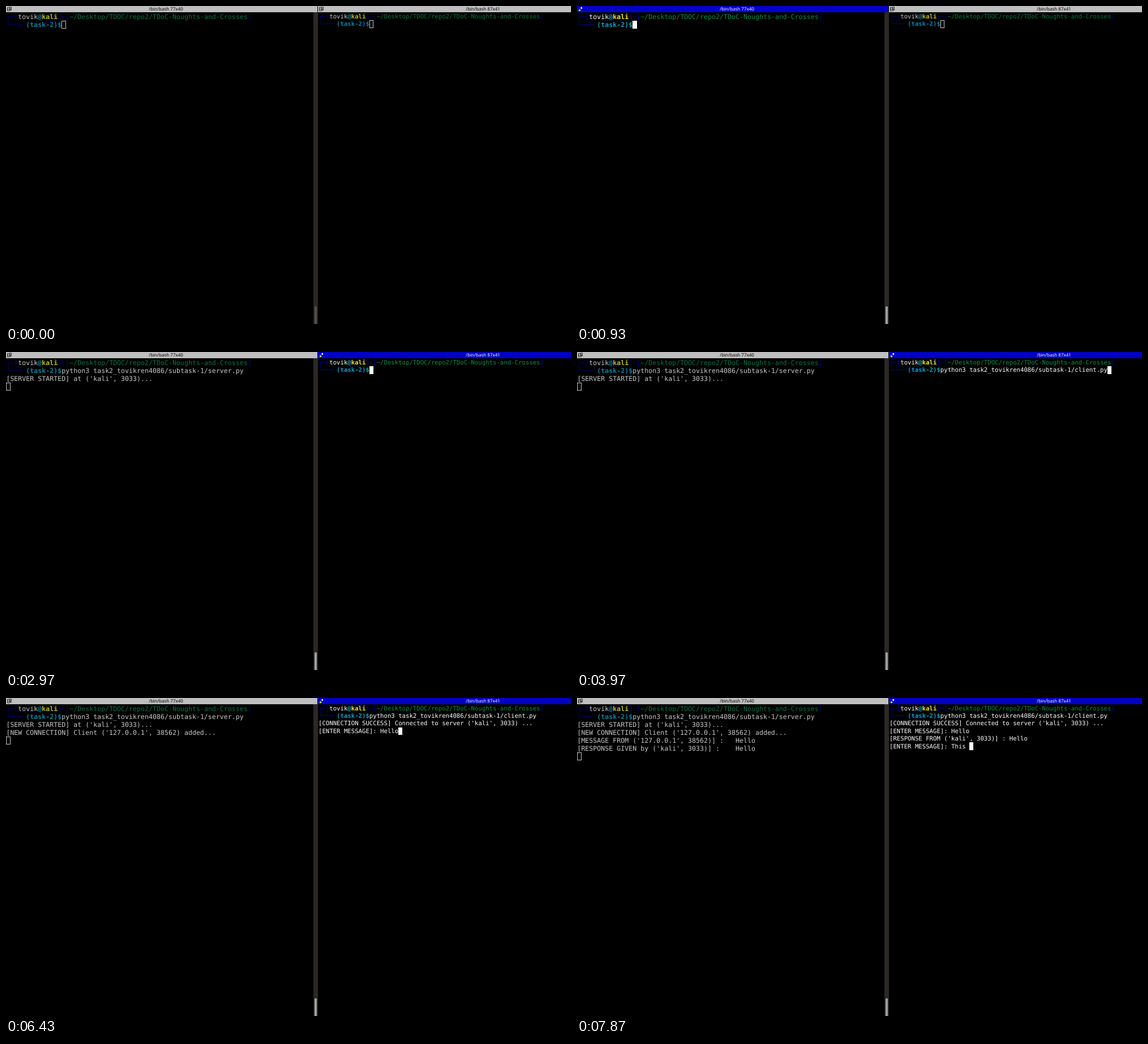
Recreate the animation shown at these times as an HTML page. Size 998 by 561 pixels, loop 8 s.

```html
<!DOCTYPE html>
<html lang="en">
<head>
<meta charset="utf-8">
<title>Two terminals</title>
<style>
html, body { margin: 0; width: 998px; height: 561px; overflow: hidden; background: #000; }
body { position: relative; }
.bar, .pane, .row, .cur, .label, .icon, #scroll, #thumb { position: absolute; }
.bar { top: 0; height: 11px; background: #bebebe; color: #000; }
.bar.on { background: #0000c8; color: #fff; }
.label { top: 0; width: 100px; text-align: center; white-space: pre; text-rendering: geometricPrecision;
  font: 8px/11px "Noto Sans", sans-serif; }
.icon { left: 2px; top: 1px; }
.icon .lit, .on .icon .dim { display: none; }
.on .icon .lit { display: inline; }
.pane { top: 0; color: #c8c8c8; font-family: "DejaVu Sans Mono", monospace;
  text-rendering: geometricPrecision; font-kerning: none; font-variant-ligatures: none;
  --line: #00007c; --host: #bcb827; --at: #0b7fa0; --path: #08733f; }
.pane.on { color: #fff; --line: #0000a0; --host: #ebe632; --at: #0d9cc2; --path: #0a8f4e; }
.row { left: 0; white-space: pre; }
.l { color: var(--line); }
.h { color: var(--host); font-weight: bold; }
.a { color: var(--at); font-weight: bold; }
.p { color: var(--path); }
.cur { box-sizing: border-box; border: 1px solid #c8c8c8; }
.on .cur { background: #fff; border-color: #fff; }
#scroll { left: 543px; top: 11px; width: 8px; height: 550px; background: #2b2825; }
#thumb { left: 545px; top: 530px; width: 4px; height: 31px; border-radius: 1px 1px 0 0; }
</style>
</head>
<body>
<div id="scroll"></div>
<div id="thumb"></div>
<script>
const LOOP = 8000;
const span = (cls, text) => `<span class="${cls}">${text}</span>`;
const head = span('l', '┌─[') + 'tovik' + span('a', '@') + span('h', 'kali') + span('l', ']─[') +
  span('p', '~/Desktop/TDOC/repo2/TDoC-Noughts-and-Crosses') + span('l', ']');
const tail = span('l', '└──╼ ') + span('a', '(task-2)$');
const command = file => `python3 task2_tovikren4086/subtask-1/${file}.py`;
const ask = '[ENTER MESSAGE]: ';

// Steps: [time, row, text, cursor row, cursor column]
const leftSteps = [
  [0, 1, '', 1, 14],
  [1770, 1, command('server'), 1, 60],
  [2070, 2, '', 2, 0],
  [2130, 2, "[SERVER STARTED] at ('kali', 3033)...", 3, 0],
  [4570, 3, "[NEW CONNECTION] Client ('127.0.0.1', 38562) added...", 4, 0],
  [6520, 4, "[MESSAGE FROM ('127.0.0.1', 38562)] :   Hello", 5, 0],
  [6520, 5, "[RESPONSE GIVEN by ('kali', 3033)] :    Hello", 6, 0]
];
const typing = (row, word, times) =>
  times.map((t, i) => [t, row, ask + word.slice(0, i + 1), row, ask.length + i + 1]);
const rightSteps = [
  [0, 1, '', 1, 14],
  [3770, 1, command('client'), 1, 60],
  [4470, 2, '', 2, 0],
  [4570, 2, "[CONNECTION SUCCESS] Connected to server ('kali', 3033) ...", 3, 17],
  [4570, 3, ask, 3, 17],
  ...typing(3, 'Hello', [5430, 5800, 5940, 6080, 6240]),
  [6490, 4, '', 4, 0],
  [6520, 4, "[RESPONSE FROM ('kali', 3033)] : Hello", 5, 17],
  [6520, 5, ask, 5, 17],
  ...typing(5, 'This ', [7330, 7450, 7570, 7700, 7820])
];

function add(parent, cls) {
  const el = document.createElement('div');
  el.className = cls;
  parent.append(el);
  return el;
}

const ICON = `<svg class="icon" width="9" height="9" fill="none" stroke="#222">
  <g class="dim"><path d="M.5 1.5h4v3h-4zM4.5 .9h3v3h-3zM.5 4.5h4v3h-4zM5.2 5.5h3M6.5 4.5v3"/></g>
  <g class="lit" stroke="none"><path fill="#e8d83c" d="M1 5h3v3H1z"/><path fill="#fff" d="M4.5 1h2.5v3H4.5z"/></g>
</svg>`;

function makePane(o) {
  const bar = add(document.body, 'bar');
  bar.style.cssText = `left:${o.barX}px;width:${o.barW}px`;
  bar.innerHTML = ICON;
  const label = add(bar, 'label');
  label.textContent = o.title;
  label.style.left = o.mid - 50 - o.barX + 'px';

  const pane = add(document.body, 'pane');
  pane.style.cssText = `left:${o.x}px;font-size:${o.cw / 0.60205}px`;
  const rows = Array.from({ length: 6 }, (_, i) => {
    const row = add(pane, 'row');
    row.style.cssText = `top:${o.y + i * o.lh}px;line-height:${o.lh}px`;
    return row;
  });
  const cur = add(pane, 'cur');
  cur.style.width = o.cw + 0.6 + 'px';
  cur.style.height = o.lh + 0.5 + 'px';
  let shown = '';

  return (t, on, visible) => {
    const past = o.steps.filter(s => s[0] <= t);
    const key = [past.length, on, visible].join();
    if (key === shown) return;
    shown = key;
    const text = Array(6).fill('');
    past.forEach(s => { text[s[1]] = s[2]; });
    text[0] = head;
    text[1] = tail + text[1];
    rows.forEach((row, i) => { row.innerHTML = text[i]; });
    const last = past[past.length - 1];
    cur.style.left = last[4] * o.cw + 'px';
    cur.style.top = o.y + last[3] * o.lh - 0.2 + 'px';
    cur.style.visibility = visible ? 'visible' : 'hidden';
    bar.classList.toggle('on', on);
    pane.classList.toggle('on', on);
  };
}

const left = makePane({ x: 0.4, y: 12, cw: 7, lh: 14, barX: 0, barW: 550, mid: 282.5,
  title: '/bin/bash 77x40', steps: leftSteps });
const right = makePane({ x: 552, y: 11.6, cw: 6.42, lh: 13.4, barX: 551, barW: 447, mid: 842.5,
  title: '/bin/bash 87x41', steps: rightSteps });

const thumb = document.getElementById('thumb');
const between = (t, a, b) => t >= a && t < b;

function draw(t) {
  left(t, between(t, 670, 2570), !between(t, 1240, 1770));
  right(t, t >= 2570, ![[3170, 3770], [5100, 5430], [7100, 7330]].some(b => between(t, ...b)));
  const k = Math.min(1, Math.max(0, (t - 670) / 200));
  const v = Math.round(80 + 80 * k);
  thumb.style.background = `rgb(${v},${v},${v})`;
}

const start = performance.now();
function tick() {
  draw((performance.now() - start) % LOOP);
  requestAnimationFrame(tick);
}
draw(0);
requestAnimationFrame(tick);
</script>
</body>
</html>
```
